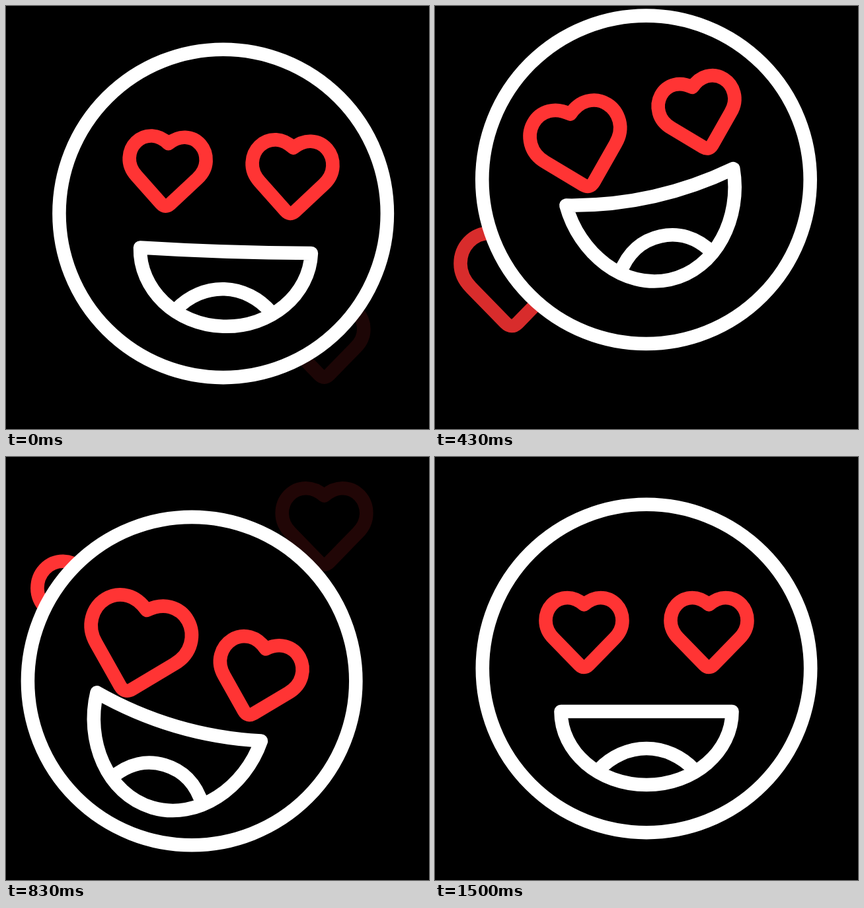
Recreate the animation shown at these times as an HTML page with a canvas. Size 640x640 px, loop 1670 ms.

```html
<!DOCTYPE html>
<html lang="en">
<head>
<meta charset="utf-8">
<title>Heart eyes</title>
<style>
  html, body { margin: 0; height: 100%; overflow: hidden; background: #000; }
  canvas { display: block; width: 100vw; height: 100vh; }
</style>
</head>
<body>
<canvas width="640" height="640"></canvas>
<script>
const ctx = document.querySelector('canvas').getContext('2d');
const LOOP = 1670, RED = '#ff3434', WHITE = '#fff';

// Tracks: [time, value, ...] keys joined by smooth curves
const face = [
  [0, 328.5, 314], [170, 352.5, 296], [235, 359, 283], [330, 350.5, 265], [380, 337, 261.7],
  [450, 313, 265], [540, 284.5, 286.5], [570, 280, 293], [690, 266.5, 320], [830, 281, 339],
  [950, 300, 334], [1070, 314.5, 323.5], [1150, 320, 320], [1500, 320, 320]];
const features = [
  [0, 335.5, 309], [170, 381.5, 288], [240, 393, 262], [330, 379, 237], [450, 312, 245],
  [570, 252, 300], [700, 246, 350], [830, 275.6, 363], [1000, 309, 337], [1150, 320, 319], [1500, 320, 320]];
const tilt = [
  [0, 2.5], [170, 19], [205, 19], [330, 0], [450, -16], [570, -10], [700, 8],
  [780, 16], [830, 15], [1000, -1], [1110, -10.5], [1170, -10.5], [1340, -4], [1500, 0]];
const mouthTilt = [
  [0, 1.8], [170, 14.5], [215, 16.5], [330, 2.2], [490, -19], [570, -17], [700, 3],
  [800, 17], [830, 16.5], [1000, 2], [1120, -9], [1170, -10], [1340, -4], [1500, 0]];
const smile = [[0, .12], [90, .65], [170, .97], [230, 1], [900, 1], [1000, .85], [1170, .12], [1250, 0], [1500, 0]];
const leftEye = [[0, 1], [170, 1.15], [310, 1.34], [330, 1.335], [440, 1.18], [570, 1.01], [700, 1.17],
  [830, 1.33], [1000, 1.05], [1150, 1.29], [1170, 1.29], [1350, 1.1], [1500, 1]];
const rightEye = [[0, 1.05], [170, 1.25], [215, 1.28], [330, 1.085], [430, 1.01], [570, 1.13], [690, 1.29],
  [830, 1.09], [910, 1.02], [1090, 1.27], [1170, 1.2], [1350, 1.04], [1500, 1]];
const floatPulse = [[0, 1.03], [90, 1.17], [250, 1.37], [420, 1.1], [580, 1.16], [700, 1.42], [830, 1.1]];

function sample(track, t) {
  const last = track.length - 1;
  if (t <= track[0][0]) return track[0].slice(1);
  if (t >= track[last][0]) return track[last].slice(1);
  const i = track.findIndex(key => key[0] > t) - 1;
  const a = track[i], b = track[i + 1];
  const before = track[Math.max(i - 1, 0)], after = track[Math.min(i + 2, last)];
  const span = b[0] - a[0], u = (t - a[0]) / span;
  return a.slice(1).map((v, k) => {
    const j = k + 1;
    const m0 = (b[j] - before[j]) / (b[0] - before[0]) * span;
    const m1 = (after[j] - a[j]) / (after[0] - a[0]) * span;
    const d = b[j] - v;
    return v + u * (m0 + u * (3 * d - 2 * m0 - m1 + u * (m0 + m1 - 2 * d)));
  });
}

const rad = degrees => degrees * Math.PI / 180;

// Scales the path but not the line width
function strokeShape(path, color, x, y, angle, scale = 1) {
  const placed = new Path2D();
  placed.addPath(new Path2D(path), new DOMMatrix().translate(x, y).rotate(angle).scale(scale));
  ctx.strokeStyle = color;
  ctx.stroke(placed);
}

const HEART = `M0-42C-7-48-16-52.5-25-52.5C-44-52.5-58-37-58-18C-58-7-53 2-46 9L-7 49Q0 56 7 49
  L46 9C53 2 58-7 58-18C58-37 44-52.5 25-52.5C16-52.5 7-48 0-42Z`;

function mouthPath(m) {
  const corner = -32 * m, sideX = 129.5 - 3.5 * m, sideY = 61 - 19 * m, top = 56 - 12 * m;
  const end = 88 - 2 * m, bend = 68 - 12 * m;
  return `M-129.5 ${corner}Q0 ${-2 * m} 129.5 ${corner}C${sideX} ${sideY} 72 111 0 111
    C-72 111 ${-sideX} ${sideY} -129.5 ${corner}Z
    M-72 ${end}C-53 ${bend} -27 ${top} 0 ${top}C27 ${top} 53 ${bend} 72 ${end}`;
}

function floatingHeart(x, t) {
  if (t < 0 || t > 835) return;
  ctx.globalAlpha = Math.max(0, Math.min(1, .11 + t * .0038, (865 - t) / 265));
  strokeShape(HEART, RED, x, 508 - .485 * t, 0, sample(floatPulse, t)[0]);
  ctx.globalAlpha = 1;
}

function draw(t) {
  ctx.fillStyle = '#000';
  ctx.fillRect(0, 0, 640, 640);
  ctx.lineWidth = 20.6;
  ctx.lineJoin = 'round';

  floatingHeart(481.5, t);
  floatingHeart(116, t - 237);

  const [fx, fy] = sample(face, t);
  ctx.beginPath();
  ctx.arc(fx, fy, 248.2, 0, 2 * Math.PI);
  ctx.fill();
  ctx.strokeStyle = WHITE;
  ctx.stroke();

  const [cx, cy] = sample(features, t), [angle] = sample(tilt, t);
  const cos = Math.cos(rad(angle)), sin = Math.sin(rad(angle));
  const place = (x, y) => [cx + x * cos - y * sin, cy + x * sin + y * cos];

  const [m] = sample(smile, t), [mouthAngle] = sample(mouthTilt, t);
  const slide = -(5 + 1.1 * (mouthAngle - angle)) * m;
  strokeShape(mouthPath(m), WHITE, ...place(slide, 65), mouthAngle);
  strokeShape(HEART, RED, ...place(-94.5, -54.5), angle, sample(leftEye, t)[0]);
  strokeShape(HEART, RED, ...place(94.5, -54.5), angle, sample(rightEye, t)[0]);
}

const start = performance.now();
function tick() {
  draw((performance.now() - start) % LOOP);
  requestAnimationFrame(tick);
}
tick();
</script>
</body>
</html>
```
